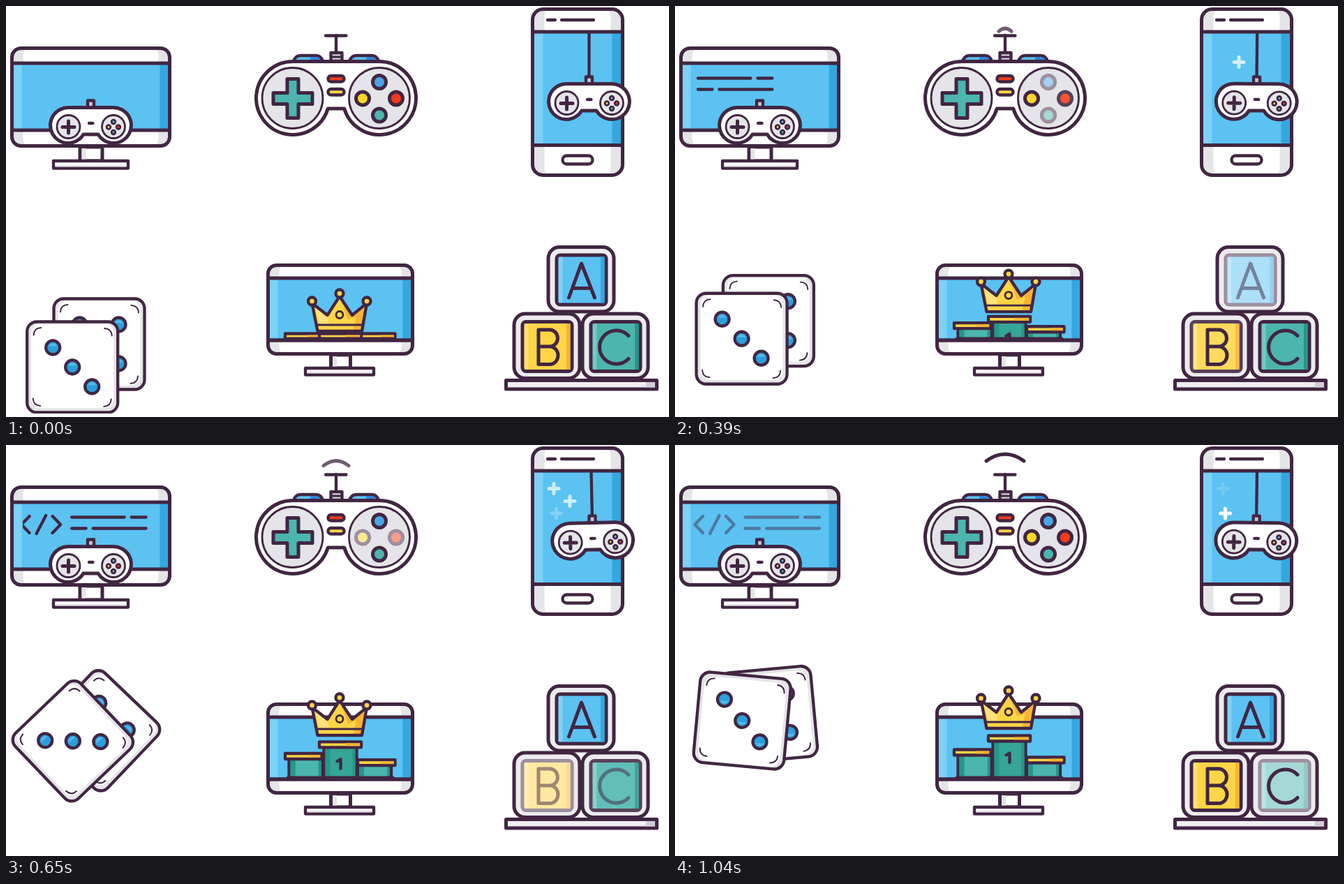
Write an HTML page that moves like this. It is 950x589 px and loops after 1080 ms.

```html
<!DOCTYPE html>
<html lang="en">
<head>
<meta charset="utf-8">
<title>Game icons</title>
<style>
  html, body { margin: 0; width: 100%; height: 100%; overflow: hidden; background: #fff; }
  svg { display: block; width: 950px; height: 589px; }
  .o { stroke: #412642; stroke-width: 5; stroke-linejoin: round; stroke-linecap: round; }
  .m { stroke-width: 4.3; }
  .t { stroke-width: 2.8; }
  .f { stroke-width: 2; }
  .n { fill: none; }
</style>
</head>
<body>
<svg id="stage" viewBox="0 0 950 589"></svg>
<script>
const STEP = 130, LOOP = 1080, LAST = 1040;
const INK = '#412642', BLUE = '#5bc2f2', PALE = '#7dd0f6', DEEP = '#35a7df', GREY = '#e5e4e8',
      TEAL = '#4bb5ae', PINE = '#259789', GOLD = '#fdd546', AMBER = '#f6b432', RED = '#f23c1c';

const box = (x, y, w, h, r, fill, cls = '', opacity = 1) =>
  `<rect x="${x}" y="${y}" width="${w}" height="${h}" rx="${r}" fill="${fill}" class="${cls}" opacity="${opacity}"/>`;
const dot = (x, y, r, fill, cls = 'o m') =>
  `<circle cx="${x}" cy="${y}" r="${r}" fill="${fill}" class="${cls}"/>`;
const path = (d, cls = 'o n', fill = 'none') => `<path d="${d}" class="${cls}" fill="${fill}"/>`;
const group = (id, body) => `<g id="${id}">${body}</g>`;
const place = (transform, body) => `<g transform="${transform}">${body}</g>`;
const clipped = (id, body) => `<g clip-path="url(#${id})">${body}</g>`;
const clip = (id, x, y, w, h) => `<clipPath id="${id}">${box(x, y, w, h, 0, INK)}</clipPath>`;

// Rounded device body with a tinted screen between two rules
function device(x, y, w, h, r, top, bottom, side) {
  const sh = bottom - top;
  return box(x, y, w, h, r, GREY) +
    box(x + side + 2, y, w - 2 * side - 4, h, 9, '#fff') +
    box(x, top, w, sh, 0, BLUE) +
    box(x, top, side, sh, 0, PALE) +
    box(x + w - side, top, side, sh, 0, DEEP) +
    box(x, y, w, h, r, 'none', 'o') +
    path(`M${x} ${top}h${w}M${x} ${bottom}h${w}`);
}

function stand(x, w, y, h, bx, bw, bh) {
  return box(x, y, w, h, 0, '#fff', 'o') + box(x + 2.5, y + 2, 6, h - 2, 0, GREY) +
    box(bx, y + h, bw, bh, 0, '#fff', 'o m') + box(bx + 3, y + h + bh - 4.5, bw - 6, 2.5, 0, GREY);
}

const smallPad =
  box(117, 135.5, 9, 10, 0, '#c9c6cf', 'o m') +
  path('M89 145.5H154A25.5 25.5 0 1 1 132 184H111A25.5 25.5 0 1 1 89 145.5Z', 'o', '#fff') +
  dot(89.5, 173, 16.5, GREY, 'o t') + dot(154, 173, 16.5, GREY, 'o t') +
  path('M81 173.5h17M89.5 165v17') +
  path('M119 168h5.5', 'o n m') +
  [BLUE, RED, TEAL, GOLD].map((c, i) =>
    dot(154 + 7 * Math.sin(i * Math.PI / 2), 173.5 - 7.5 * Math.cos(i * Math.PI / 2), 2.8, c, 'o t')).join('');

function codeMonitor() {
  const code = path('M40 102L28.5 114L40 126M63.5 101L50 127M73 102L84.5 114L73 126' +
    'M100.5 103.5H176M186 103.5H207M100.5 119.5H121M131 119.5H207', 'o n m');
  return device(8.5, 60.5, 226, 140, 13, 82, 178, 14) +
    stand(106, 32, 202, 20, 68, 107, 10.5) +
    clipped('codeClip', group('code', code)) + smallPad;
}

function bigPad() {
  const shoulder = x => path(`M${x} 80q2-9 10-9h22q8 0 10 9z`, 'o m', BLUE) +
    path(`M${x + 24} 73h8q5 0 7 6h-15z`, '', '#2f86df');
  const key = (id, x, y, c) => dot(x, y, 11, '#fff', '') + group(id, dot(x, y, 9.5, c, 'o'));
  const wave = i => group('wave' + i,
    path(`M${473 - 9 * i} ${43 - 6.7 * i}q${9 * i} ${-5.5 * i - 3} ${18 * i} 0`));
  return shoulder(412) + shoulder(492) +
    path('M473 42V66M458 42.5H487.5', 'o n m') +
    box(465.5, 67, 16, 12, 0, '#d3d1d8', 'o m') + path('M466 73h15', 'o n t') +
    path('M411 79.5H535A52.5 52.5 0 1 1 484.7 147H461.3A52.5 52.5 0 1 1 411 79.5Z', 'o', '#fff') +
    dot(410.5, 132, 43.5, GREY, 'o t') + dot(535, 132, 43.5, GREY, 'o t') +
    path('M403 104.5h16v20h20v16h-20v20h-16v-20h-20v-16h20z', 'o', TEAL) +
    box(461.5, 100, 23, 8.5, 4, RED, 'o m') + box(461.5, 119, 23, 8.5, 4, GOLD, 'o m') +
    key('keyUp', 535, 109, '#4aa6e8') + key('keyLeft', 511, 132.5, '#f8d728') +
    key('keyRight', 559, 132.5, RED) + key('keyDown', 535, 156.5, TEAL) +
    [1, 2, 3].map(wave).join('');
}

function phone() {
  const spark = (id, x, y) =>
    `<path id="${id}" d="M${x - 7} ${y}h14M${x} ${y - 7}v14" stroke="#fff" stroke-width="5" stroke-linecap="round"/>`;
  return device(754.5, 4.5, 129, 238, 15, 37, 199.5, 15) +
    path('M776 20h11M796 20h46', 'o n m') + box(797.5, 214.5, 43, 12, 6, '#fff', 'o m') +
    spark('sparkA', 785, 62.5) + spark('sparkB', 808, 80.5) + spark('sparkC', 788.5, 98) +
    clipped('swingClip', group('swing',
      path('M835.5 10V102', 'o n m') + place('translate(714 -34)', smallPad)));
}

function die(id, pips) {
  const corner = path('M-55.5 -46Q-55 -56 -45 -56.5', 'o n f');
  const pip = ([x, y]) => dot(x, y, 10, '#2b9fdc') +
    path(`M${x - 6} ${y - 2}a6.5 6.5 0 0 1 12 0z`, '', '#57b9ea');
  return group(id, box(-65, -65, 130, 130, 14, GREY) + box(-59, -62, 118, 121, 13, '#fff') +
    box(-65, -65, 130, 130, 14, 'none', 'o m') +
    [0, 90, 180, 270].map(a => place(`rotate(${a})`, corner)).join('') +
    pips.map(pip).join(''));
}

function crownMonitor() {
  const tier = (id, x, w, cx, cw, main, extra = '') => group(id,
    box(x, 8, w, 80, 0, main, 'o m') + box(x + 2, 10, 7, 76, 0, PINE) +
    box(x + w - 6, 10, 4, 76, 0, PINE) +
    box(cx, 1.5, cw, 8, 0, GOLD, 'o m') + box(cx + cw * .62, 3.5, cw * .35, 4, 0, AMBER) + extra);
  const one = path('M474.5 29.5L479.5 26.5V40', 'o n m');
  const rim = 'M438.5 14L446.5 54H510L517 14L496 31L478 4L460.5 31Z';
  const crown = path(rim, '', GOLD) +
    path('M478 4L496 31L517 14L510 54H497L502 33L490 37Z', '', AMBER) +
    path('M443 20L460 32L463 44H449Z', '', '#ffe07a') +
    path(rim, 'o n m') + path('M446 45H511', 'o n t') + dot(478, 30.5, 5, GOLD, 'o t') +
    dot(438.5, 11, 5.5, GOLD) + dot(478, 0, 5.5, GOLD) + dot(517, 11, 5.5, GOLD);
  return device(375.5, 371.5, 207, 127, 12, 390, 479, 14) +
    stand(465.5, 28, 500, 19, 429, 98, 9.5) +
    clipped('podiumClip',
      tier('left', 405.5, 48, 400, 52, TEAL) + tier('right', 504, 48, 504, 53.5, TEAL) +
      tier('mid', 455.5, 47, 449, 60, '#35a598', one)) +
    path('M376 479h206') + path('M404 477h150') + group('crown', crown);
}

function blocks() {
  const block = (id, x, y, main, shade, letter) =>
    box(x, y, 94, 92.5, 16, '#ecebef', 'o') +
    box(x + 11, y + 10.5, 73, 73, 6, '#fff') +
    group(id + 'Face', box(x + 12, y + 11.5, 71, 71, 5, main, 'o') +
      box(x + 14.5, y + 14, 6, 66, 0, '#fff', '', .25) +
      box(x + 75, y + 14, 5.5, 66, 0, shade)) +
    group(id + 'Sign', path(letter));
  return box(716.5, 536.5, 216, 12.5, 0, '#efeef2', 'o') +
    box(917, 539, 13, 7.5, 0, '#d0ced6') +
    block('b', 728, 441, GOLD, AMBER,
      'M763 464H779A11.5 12 0 0 1 779 488H763M779 488H781A12.5 13 0 0 1 781 513.5H763V464') +
    block('c', 826, 441, TEAL, PINE, 'M892 472.5A24 24 0 1 0 892 505.5') +
    block('a', 777, 345.5, BLUE, DEEP, 'M806.5 418L824.5 369L843.5 418M812 404.5H838');
}

const $ = id => document.getElementById(id);
$('stage').innerHTML =
  `<defs>${clip('codeClip', 24, 84, 208, 92)}${clip('swingClip', 700, 36, 250, 170)}` +
  `${clip('podiumClip', 376, 380, 206, 99)}${clip('diceClip', 0, 300, 300, 284)}</defs>` +
  codeMonitor() + bigPad() + phone() +
  clipped('diceClip', die('back', [[-28, -28], [28, -28], [-28, 28], [28, 28]]) +
    die('front', [[-28, -28], [0, 0], [28, 28]])) +
  crownMonitor() + blocks();

const move = (id, value) => $(id).setAttribute('transform', value);
const fade = (id, value) => $(id).setAttribute('opacity', value);
const clamp = v => Math.min(1, Math.max(0, v));
const peak = (t, mid, half) => clamp(1 - Math.abs(t - mid) / half);

// Straight lines through [time, value] points
function along(t, points) {
  const i = Math.max(1, points.findIndex(p => p[0] >= t));
  const [t0, v0] = points[i - 1], [t1, v1] = points[i];
  return v0 + (v1 - v0) * (t - t0) / (t1 - t0);
}

// Middle and half length, in ms, of each dip to half opacity
const blinks = {
  keyUp: [260, 260], keyDown: [390, 260], keyLeft: [585, 195], keyRight: [600, 240],
  aFace: [390, 260], bFace: [600, 240], cFace: [910, 300],
  aSign: [260, 260], bSign: [585, 195], cSign: [715, 195]
};

function draw(t) {
  for (const id in blinks) fade(id, 1 - .5 * clamp(2 * peak(t, ...blinks[id])));

  for (const i of [1, 2, 3]) {
    const age = t - 260 * i;
    fade('wave' + i, age >= 0 && age < 390 ? .5 + age / 520 : 0);
  }

  fade('sparkA', peak(t, 750, 340));
  fade('sparkB', peak(t, 510, 450));
  fade('sparkC', peak(t, LAST, 520));

  const ahead = clamp(1 - t / 780);
  move('code', `translate(${-300 * ahead ** 2.15} 0)`);
  fade('code', clamp(1 - (t - 780) / 500));

  const lean = along(t, [[0, 0], [260, 1.45], [650, -1.25], [780, 0], [LAST, .65]]);
  move('swing', `rotate(${lean} 835.5 -100)`);

  const rise = 1 - (1 - (t / LAST) ** 1.7) ** 3;
  const lift = (id, from, by) => move(id, `translate(0 ${from - by * rise})`);
  lift('left', 468, 33);
  lift('mid', 468, 53);
  lift('right', 468, 22);
  lift('crown', 412, 60);

  const spin = Math.max(0, t - 520) * .336;
  const frontY = along(t, [[0, 517.5], [260, 503], [780, 398], [LAST, 395]]);
  const backY = along(t, [[0, 484.5], [260, 472], [780, 388.5], [LAST, 386.5]]);
  const drift = t / LAST;
  move('front', `translate(${95.2 + drift} ${frontY}) rotate(${-spin})`);
  move('back', `translate(${133.5 + drift} ${backY}) rotate(${spin})`);
}

const start = performance.now();
let shown = -1;
function tick() {
  const step = Math.floor(((performance.now() - start) % LOOP) / STEP);
  if (step !== shown) draw((shown = step) * STEP);
  requestAnimationFrame(tick);
}
tick();
</script>
</body>
</html>
```
